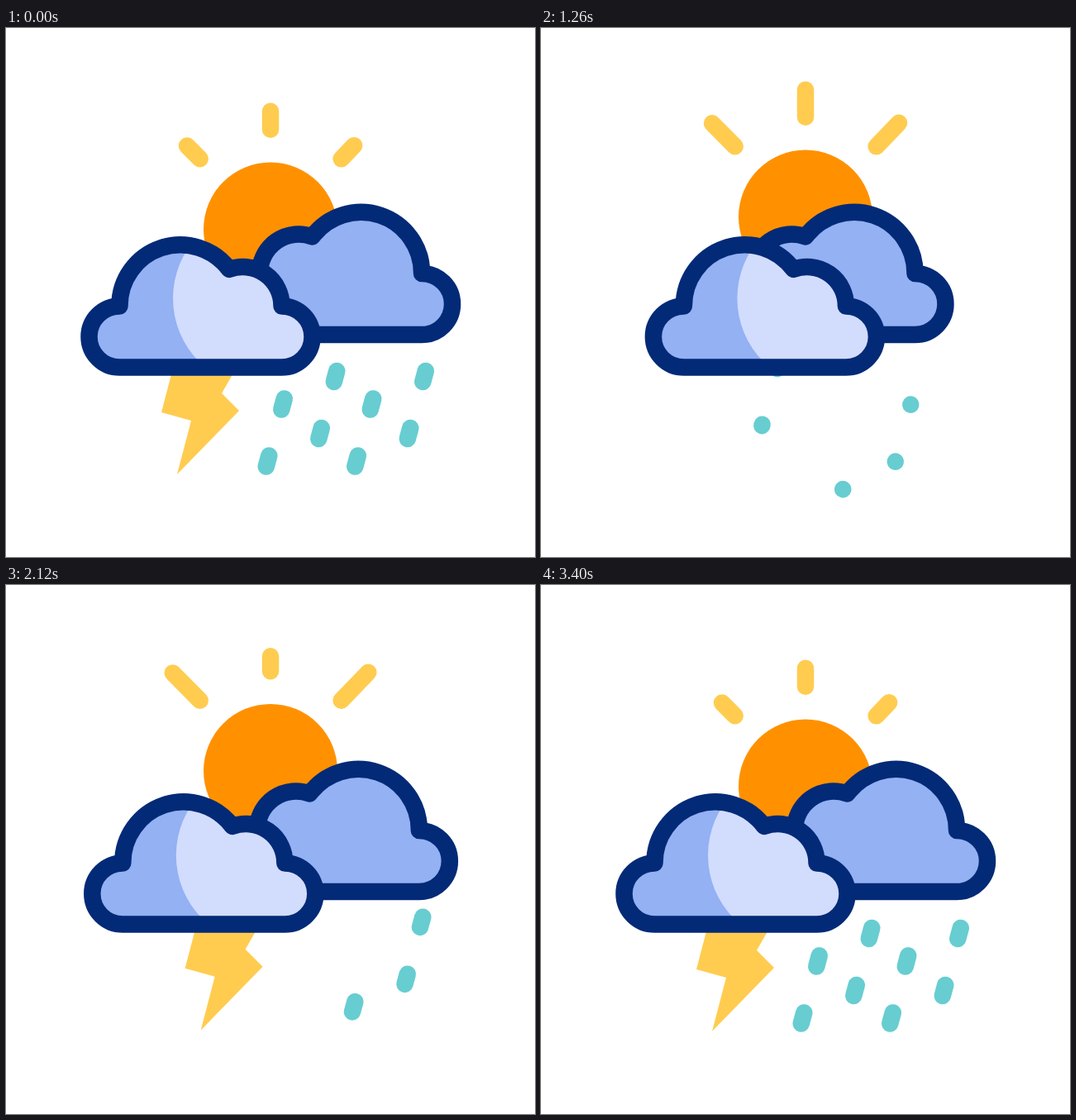
An HTML page that plays this animation: 640x640 px, repeating every 3600 ms.

```html
<!DOCTYPE html>
<html lang="en">
<head>
<meta charset="utf-8">
<title>Weather</title>
<style>
  html, body { margin: 0; width: 100%; height: 100%; overflow: hidden; background: #fff; }
  svg { display: block; width: 100%; height: 100%; }
  .cloud { stroke: #032a77; stroke-width: 20.5; stroke-linejoin: round; }
  .ray, .drop { stroke-width: 20.5; stroke-linecap: round; }
  .ray { stroke: #ffcc50; }
  .drop { stroke: #67cdd1; }
</style>
</head>
<body>
<svg viewBox="0 0 640 640">
  <defs>
    <path id="cloud" d="M137.5 410.5A37 37 0 0 1 137.5 336.5A73.5 73.5 0 0 1 270 292A47 47 0 0 1 333.5 336.5A37 37 0 0 1 333.5 410.5Z"/>
    <clipPath id="cloudClip"><use href="#cloud"/></clipPath>
  </defs>
  <g id="sun">
    <circle cx="320" cy="243.5" r="81" fill="#ff9100"/>
    <line id="rayTop" class="ray"/>
    <line id="rayLeft" class="ray"/>
    <line id="rayRight" class="ray"/>
  </g>
  <g id="rain"></g>
  <polygon id="bolt" fill="#ffcc50" points="205,400 188,465 224,475 207,540 282,463 261,442 285,400"/>
  <g id="back">
    <use href="#cloud" class="cloud" fill="#93b1f3" transform="translate(640.5 -39.5) scale(-1 1)"/>
  </g>
  <g id="front">
    <use href="#cloud" fill="#93b1f3"/>
    <circle cx="311" cy="327" r="109" fill="#d2dcfd" clip-path="url(#cloudClip)"/>
    <use href="#cloud" class="cloud" fill="none"/>
  </g>
</svg>
<script>
const LOOP = 3600, BEGIN = 400, END = 3400;
const DROP_LENGTH = 13.5;
const byId = id => document.getElementById(id);
const mix = (a, b, p) => a + (b - a) * p;

// Eased progress from time a to time b.
function ease(t, a, b) {
  const s = Math.min(1, Math.max(0, (t - a) / (b - a)));
  return s * s * (3 - 2 * s);
}

// Leaves rest at BEGIN, alternates first, second, first... at the turns, is back at END.
function swing(t, rest, first, second, ...turns) {
  let value = rest, from = BEGIN;
  [...turns, END].forEach((to, i) => {
    const goal = to === END ? rest : i % 2 ? second : first;
    value = mix(value, goal, ease(t, from, to));
    from = to;
  });
  return value;
}

function setLine(line, x1, y1, x2, y2) {
  Object.entries({ x1, y1, x2, y2 }).forEach(([name, v]) => line.setAttribute(name, v.toFixed(2)));
}

function move(id, x, y) {
  byId(id).setAttribute("transform", `translate(${x.toFixed(2)} ${y.toFixed(2)})`);
}

// Slanted lattice of four rows; each digit tells in which wave that drop falls.
const drops = [..."02011202"].map((wave, i) => {
  const row = i >> 1, column = i % 2, odd = row % 2, pair = row >> 1;
  const line = document.createElementNS("http://www.w3.org/2000/svg", "line");
  line.setAttribute("class", "drop");
  byId("rain").append(line);
  return {
    line, wave: Number(wave),
    x: 398.5 + 107.5 * column - 63.5 * odd - 18.5 * pair,
    y: 421.5 + 33.5 * odd + 69 * pair
  };
});

// Each wave falls away, passes through once, then comes back to rest.
function dropPose(t, wave) {
  const fall = BEGIN + 150 * wave, pass = 1200 + 285 * wave, enter = 2640 + 140 * wave;
  if (t < fall + 600) {
    const p = ease(t, fall, fall + 600);
    return { dx: -8.3 * p, dy: 34.5 * p, length: DROP_LENGTH * (1 - p) };
  }
  if (t > pass && t < pass + 600) {
    const p = ease(t, pass, pass + 600);
    return { dx: mix(1.6, -1.3, p), dy: mix(-45, 5, p), length: DROP_LENGTH * 4 * p * (1 - p) };
  }
  if (t > enter) {
    const p = ease(t, enter, enter + 480);
    return { dx: mix(1.6, 0, p), dy: mix(-45, 0, p), length: DROP_LENGTH * p };
  }
  return null;
}

function drawRain(t, cloudX) {
  for (const drop of drops) {
    const pose = dropPose(t, drop.wave);
    drop.line.setAttribute("visibility", pose ? "visible" : "hidden");
    if (!pose) continue;
    const x = drop.x + pose.dx + cloudX, y = drop.y + pose.dy;
    const half = Math.max(pose.length, 0.1) / 2;
    setLine(drop.line, x + half * 0.26, y - half * 0.966, x - half * 0.26, y + half * 0.966);
  }
}

// Shrinks into the cloud, grows back while shooting right, then drifts home.
function drawBolt(t) {
  const hide = ease(t, BEGIN, 1080) - ease(t, 1400, 1940);
  const drift = ease(t, 2000, 2600);
  let x = 0, y = 0;
  if (t > 1400) {
    const shoot = ease(t, 1400, 2000);
    x = mix(mix(-68, 32, shoot), 0, drift);
    y = mix(mix(-9, -1.3, shoot), 0, ease(t, 2600, END));
  }
  byId("bolt").setAttribute("visibility", hide < 1 ? "visible" : "hidden");
  byId("bolt").setAttribute("transform",
    `translate(${199.5 + x} ${409 + y}) scale(${1 - 0.72 * hide} ${1 - hide}) translate(-199.5 -409)`);
}

function drawSun(t) {
  const sideRay = lastTurn => swing(t, 15.7, 39.3, 10.5, 1000, 1600, 2000, 2400, lastTurn);
  const top = swing(t, 22, 16, 58.2, 1000, 1600, 2200, 2800);
  const left = sideRay(3000), right = sideRay(3200);
  move("sun", 0, t < 1000 ? 0 : -10.25 * (1 - Math.cos(Math.PI * sunPhase(t))));
  setLine(byId("rayTop"), 320, 122.75, 320, 122.75 - top);
  setLine(byId("rayLeft"), 234.7, 158.3, 234.7 - left, 158.3 - left * 1.01);
  setLine(byId("rayRight"), 405.6, 158.3, 405.6 + right * 0.99, 158.3 - right * 1.03);
}

// Counts the sun's moves, up and down in turn, 400 ms each.
const sunPhase = t => Math.min(6, (t - 1000) / 400);

function draw(t) {
  const backX = swing(t, 0, -51.4, 0, 1200, 2000, 2800);
  move("back", backX, 0);
  move("front", swing(t, 0, 36, 0, 1200, 2000, 2600), 0);
  drawSun(t);
  drawRain(t, backX);
  drawBolt(t);
}

const start = performance.now();
function tick() {
  draw((performance.now() - start) % LOOP);
  requestAnimationFrame(tick);
}
tick();
</script>
</body>
</html>
```
